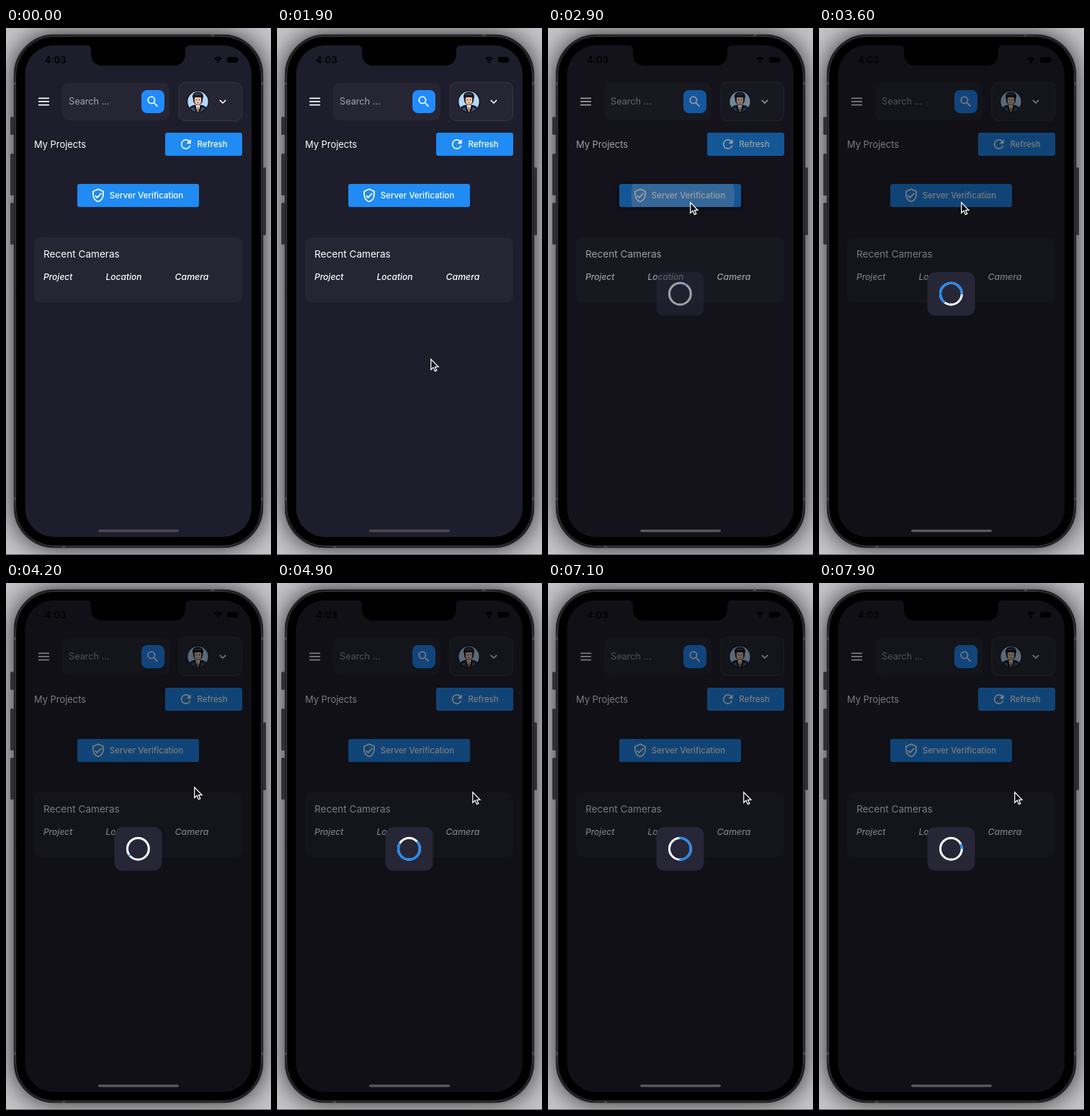
An HTML page with a canvas that plays this animation: 368x730 px, repeating every 8 s.

```html
<!DOCTYPE html>
<html lang="en">
<head>
<meta charset="utf-8">
<title>Server verification</title>
<style>
html, body { margin: 0; width: 100%; height: 100%; overflow: hidden; background: #aaa9ad; }
canvas { display: block; width: 368px; height: 730px; }
</style>
</head>
<body>
<canvas id="stage"></canvas>
<script>
const W = 368, H = 730, LOOP = 8000, STEP = 100;
const BG = '#1e1d2b', CARD = '#262534', BLUE = '#1f8bf3', WHITE = '#fff';
const canvas = document.getElementById('stage');
const ctx = canvas.getContext('2d');
const ratio = window.devicePixelRatio || 1;
canvas.width = W * ratio;
canvas.height = H * ratio;

const ICONS = {
  search: new Path2D('M15.5 14h-.79l-.28-.27A6.5 6.5 0 1 0 13.73 14.43l.27.28v.79l5 5 1.5-1.5zm-6 0a4.5 4.5 0 1 1 0-9 4.5 4.5 0 0 1 0 9z'),
  chevron: new Path2D('M7.4 8.6L12 13.2l4.6-4.6L18 10l-6 6-6-6z'),
  refresh: new Path2D('M17.65 6.35A7.95 7.95 0 0 0 12 4a8 8 0 1 0 7.73 10h-2.08A6 6 0 1 1 12 6c1.66 0 3.14.69 4.22 1.78L13 11h7V4z'),
  shield: new Path2D('M12 2.1L4 5.65V11c0 5 3.4 9.7 8 10.95 4.6-1.25 8-5.95 8-10.95V5.65zM7 12.4l3.2 3.2 7-7'),
  cursor: new Path2D('M0 0V14.4L3.3 11.3L5.6 16.6L8 15.6L5.7 10.5H10.2z')
};

const clamp = v => Math.min(1, Math.max(0, v));
const easeOut = v => 1 - (1 - clamp(v)) ** 2;

// Solves cubic-bezier(.4, 0, .2, 1) by bisection.
function standardEase(x) {
  if (x <= 0 || x >= 1) return clamp(x);
  let lo = 0, hi = 1;
  for (let i = 0; i < 20; i++) {
    const s = (lo + hi) / 2, r = 1 - s;
    if (1.2 * r * r * s + 0.6 * r * s * s + s ** 3 < x) lo = s; else hi = s;
  }
  return 3 * (1 - lo) * lo * lo + lo ** 3;
}

function box(x, y, w, h, r, fill, stroke) {
  ctx.beginPath();
  ctx.roundRect(x, y, w, h, r);
  if (fill) { ctx.fillStyle = fill; ctx.fill(); }
  if (stroke) { ctx.strokeStyle = stroke; ctx.stroke(); }
}

function disc(x, y, r, fill) {
  ctx.beginPath();
  ctx.arc(x, y, r, 0, Math.PI * 2);
  ctx.fillStyle = fill;
  ctx.fill();
}

function shape(path, fill) {
  ctx.fillStyle = fill;
  ctx.fill(new Path2D(path));
}

function text(str, x, y, size, style = '400', color = WHITE) {
  ctx.font = `${style} ${size}px Inter, sans-serif`;
  ctx.fillStyle = color;
  ctx.fillText(str, x, y);
}

function icon(path, cx, cy, scale, lineWidth) {
  ctx.save();
  ctx.translate(cx - 12 * scale, cy - 12 * scale);
  ctx.scale(scale, scale);
  ctx.fillStyle = ctx.strokeStyle = WHITE;
  ctx.lineWidth = lineWidth || 1;
  if (lineWidth) ctx.stroke(path); else ctx.fill(path);
  ctx.restore();
}

function drawPhone() {
  ctx.fillStyle = '#c6c5c9';
  ctx.fillRect(0, 0, W, H);
  ctx.save();
  ctx.shadowColor = 'rgba(0,0,0,.8)';
  ctx.shadowBlur = 34 * ratio;
  box(11, 9, 346, 711, 56, '#000');
  ctx.restore();
  for (const [x, y, w, h] of [[6, 123, 5, 25], [6, 174, 5, 58], [6, 242, 5, 58], [357, 193, 4, 94]]) {
    box(x, y, w, h, 1.5, '#303033');
  }
  ctx.lineWidth = 1.5;
  box(11.5, 9.5, 345, 710, 55.5, '#18181a', '#29292b');
  ctx.lineWidth = 1;
  box(13.5, 11.5, 341, 706, 53.5, '#000', '#414144');
  ctx.fillStyle = '#444447';
  for (const y of [75, 650]) {
    ctx.fillRect(11, y, 3, 4);
    ctx.fillRect(354, y, 3, 4);
  }
  ctx.fillRect(78, 717, 4, 3);
  ctx.fillRect(285, 9, 4, 3);
  ctx.fillStyle = '#57565a';
  ctx.fillRect(0, 729, W, 1);
}

function drawAvatar() {
  disc(266.5, 102, 15.3, '#0c0e18');
  ctx.save();
  ctx.beginPath();
  ctx.arc(266.5, 102, 14.2, 0, Math.PI * 2);
  ctx.clip();
  ctx.fillStyle = '#b4d8f6';
  ctx.fillRect(251, 87, 31, 31);
  shape('M254 118V113Q254 108 262 106.5H271Q279 108 279 113V118z', '#121624');
  shape('M256 118V113.5Q257 110.5 261 109.5L264 118z', '#3d5274');
  shape('M277 118V113.5Q276 110.5 272 109.5L269 118z', '#3d5274');
  shape('M263.5 107H269.5L268.6 112L266.5 115L264.4 112z', '#e9ebee');
  shape('M265.7 109H267.3L268 115L266.5 117.5L265 115z', '#b27a35');
  box(259.8, 91.5, 13.4, 14.5, 6, '#11131e');
  box(261.8, 94, 9.4, 12, 4.5, '#f2c3a3');
  shape('M259 97V94Q260 88.5 266.5 88.5Q273 88.5 274 94V97L271.5 96H261.5z', '#151928');
  ctx.fillStyle = '#3f5274';
  ctx.fillRect(262.5, 91, 8, 1.6);
  disc(264.5, 99.5, 0.75, '#11131e');
  disc(268.5, 99.5, 0.75, '#11131e');
  ctx.fillStyle = '#6d3e33';
  ctx.fillRect(265.2, 103, 2.6, 0.9);
  ctx.restore();
}

function drawStatusBar() {
  text('4:03', 54, 49, 13, '600', '#000');
  ctx.strokeStyle = '#000';
  ctx.lineWidth = 2;
  for (const r of [4, 7.2]) {
    ctx.beginPath();
    ctx.arc(294.5, 48, r, -2.3, -0.84);
    ctx.stroke();
  }
  disc(294.5, 47.3, 1.4, '#000');
  box(307, 40, 14.5, 8, 2.5, '#000');
  box(322, 42.5, 1.2, 3, 0.6, '#000');
  for (let i = 0; i < 4; i++) disc(274 + i * 2.7, 47, 0.6, '#181723');
}

function drawRipple(t) {
  const age = t - 2700;
  if (age < 0 || age > 500) return;
  const k = easeOut((age + 60) / 400);
  ctx.save();
  ctx.beginPath();
  ctx.roundRect(99, 216, 169, 32, 3);
  ctx.clip();
  const alpha = 0.24 * clamp((500 - age) / 250);
  disc(197 - 11 * k, 241 - 9 * k, 12 + 68 * k, `rgba(255,255,255,${alpha})`);
  ctx.restore();
}

function drawPage(t) {
  ctx.fillStyle = BG;
  ctx.fillRect(26, 24, 316, 682);
  drawStatusBar();

  ctx.fillStyle = WHITE;
  for (const y of [96.5, 101, 105.7]) ctx.fillRect(45, y, 15, 1.7);
  box(78, 76, 149, 52, 9, CARD);
  text('Search ...', 87, 106, 12.7, '400', '#a5a4ac');
  box(188, 86, 32, 32, 8, '#218bff');
  icon(ICONS.search, 204, 102, 0.84);

  ctx.lineWidth = 1;
  box(240, 75.5, 87.5, 53, 9, CARD, '#373645');
  drawAvatar();
  icon(ICONS.chevron, 301, 102, 0.78);

  text('My Projects', 39, 165.5, 12.9);
  box(221, 145, 107, 32, 3, BLUE);
  icon(ICONS.refresh, 249.8, 161, 0.86);
  text('Refresh', 265.5, 165, 11.4, '500');

  ctx.save();
  if (t >= 2700 && t < 3100) {
    ctx.shadowColor = 'rgba(0,0,0,.5)';
    ctx.shadowBlur = 8 * ratio;
    ctx.shadowOffsetY = 2 * ratio;
  }
  box(99, 216, 169, 32, 3, BLUE);
  ctx.restore();
  drawRipple(t);
  icon(ICONS.shield, 128, 231.8, 0.87, 2);
  text('Server Verification', 143.7, 235.7, 11.5, '500');

  box(39, 290, 289, 90, 9, CARD);
  text('Recent Cameras', 52, 317.5, 13.6);
  text('Project', 52, 348.5, 12, 'italic 500');
  text('Location', 138.5, 348.5, 12, 'italic 500');
  text('Camera', 234.5, 348.5, 12.3, 'italic 500');
}

function drawLoader(t) {
  const age = t - 2700;
  if (age < 0) return;
  ctx.fillStyle = `rgba(5,5,4,${0.52 * easeOut((age + 20) / 450)})`;
  ctx.fillRect(26, 24, 316, 682);

  ctx.save();
  ctx.globalAlpha = clamp((age + 20) / 380);
  box(150.5, 338, 66, 60.5, 11, '#272637');
  const spin = Math.max(0, t - 2805);
  const phase = spin / 1333 % 1;
  const head = standardEase(phase * 2) * 1.5 * Math.PI;
  const tail = standardEase(phase * 2 - 1) * 1.5 * Math.PI;
  const turn = spin / 2222 * 2 * Math.PI + phase * Math.PI / 2 - Math.PI / 2;
  ctx.lineWidth = 3.1;
  const arc = (from, to, color) => {
    ctx.beginPath();
    ctx.arc(183.4, 368.2, 14.9, from, to);
    ctx.strokeStyle = color;
    ctx.stroke();
  };
  arc(0, 2 * Math.PI, WHITE);
  arc(turn + tail, turn + head + 0.01, BLUE);
  ctx.restore();
}

function drawNotch(t) {
  shape('M112 23V24Q118 24 118 30V35Q118 52 135 52H232Q249 52 249 35V30Q249 24 255 24V23z', '#000');
  box(128, 694.7, 112, 3.6, 1.8, t < 2800 ? '#4b4a53' : '#58575c');
}

// Time, x, y of the pointer tip.
const POINTER = [
  [1500, 358, 653], [1600, 318, 640], [1700, 270, 612], [1800, 236, 543],
  [1900, 213, 458], [2100, 200, 318], [2300, 196, 249], [2500, 197, 241],
  [3600, 197, 241], [3800, 212, 252], [4100, 256, 279], [4400, 271, 289], [LOOP, 271, 289]
];

function drawPointer(t) {
  if (t < POINTER[0][0]) return;
  const i = POINTER.findIndex(p => p[0] > t);
  const [t0, x0, y0] = POINTER[i - 1], [t1, x1, y1] = POINTER[i];
  const k = (t - t0) / (t1 - t0);
  ctx.save();
  ctx.translate(x0 + (x1 - x0) * k + 0.8, y0 + (y1 - y0) * k + 0.8);
  ctx.fillStyle = '#000';
  ctx.strokeStyle = WHITE;
  ctx.lineWidth = 1.3;
  ctx.fill(ICONS.cursor);
  ctx.stroke(ICONS.cursor);
  ctx.restore();
}

function render(t) {
  ctx.setTransform(ratio, 0, 0, ratio, 0, 0);
  drawPhone();
  ctx.save();
  ctx.beginPath();
  ctx.roundRect(26.5, 24, 314.5, 681, 40);
  ctx.clip();
  drawPage(t);
  drawLoader(t);
  ctx.restore();
  drawNotch(t);
  drawPointer(t);
}

let start;
function tick(now) {
  start ??= now;
  render(Math.floor((now - start) % LOOP / STEP) * STEP);
  requestAnimationFrame(tick);
}
render(0);
requestAnimationFrame(tick);
</script>
</body>
</html>
```
